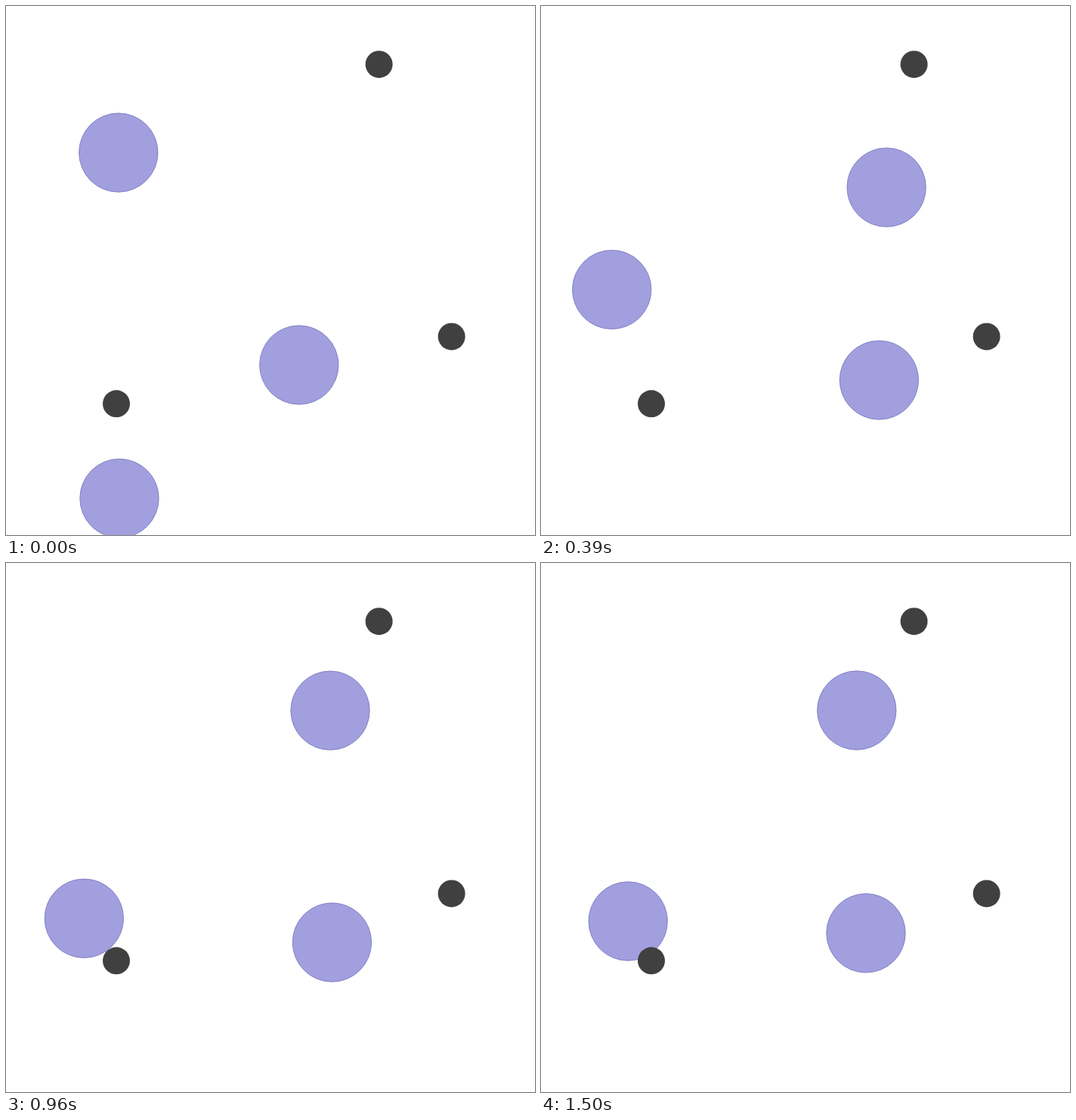
An HTML page that plays this animation: 700 px wide and 700 px high, repeating every 1530 ms.

```html
<!DOCTYPE html>
<html lang="en">
<head>
<meta charset="utf-8">
<title>Evolving circles</title>
<style>
  html, body { margin: 0; width: 100%; height: 100%; overflow: hidden; background: #fff; }
  svg { display: block; width: 100vw; height: 100vh; }
  .ball { fill: #a19fde; stroke: #7775bd; stroke-width: .8; }
  .peg { fill: #404040; }
</style>
</head>
<body>
<svg viewBox="0 0 700 700">
  <circle class="ball" r="52.2"/>
  <circle class="ball" r="52.2"/>
  <circle class="ball" r="52.2"/>
  <circle class="peg" cx="493.6" cy="77.2" r="18"/>
  <circle class="peg" cx="589.6" cy="437.4" r="18"/>
  <circle class="peg" cx="146" cy="526.3" r="18"/>
</svg>
<script>
const STEP = 30, STEPS = 51, SIZE = 700;
const balls = document.querySelectorAll('.ball');

// Generation, then the x and y genes of the three balls
const poses = [
  [0,  [148.8, 194, 387.8, 475, 150, 651.5]],
  [8,  [462.6, 240, 20.2, 375.3, 221, 508.4]],
  [18, [420.3, 197.5, 93.7, 460, 447.4, 495]],
  [27, [428, 195, 106.9, 473, 431.4, 504.8]],
  [37, [429, 193.8, 104, 474, 430.1, 502]],
  [43, [428, 194.9, 81.8, 474, 430, 502.5]],
  [50, [417.8, 195, 115.2, 474, 430, 489.8]]
];
const flipSign = [-1, 1, -1, -1, -1, 1];

function rand(a, b, c) {
  const s = Math.sin(a * 12.9898 + b * 78.233 + c * 37.719) * 43758.5453;
  return s - Math.floor(s);
}

// Every gene comes from one of two neighbouring poses, at times with a flipped bit
function genesAt(gen) {
  const next = poses.findIndex(p => p[0] >= gen);
  const [to, child] = poses[next];
  if (to === gen) return child;
  const [from, parent] = poses[next - 1];
  const mix = (gen - from) / (to - from);
  return parent.map((gene, i) => {
    const value = rand(gen, i, 1) < mix ? child[i] : gene;
    if (rand(gen, i, 2) > 0.25) return value;
    const bit = 7 + Math.floor(rand(gen, i, 3) * 4);
    return value + flipSign[i] * SIZE / 2 ** bit;
  });
}

let shown = -1;
function draw(gen) {
  if (gen === shown) return;
  shown = gen;
  const genes = genesAt(gen);
  balls.forEach((ball, i) => {
    ball.setAttribute('cx', genes[2 * i]);
    ball.setAttribute('cy', genes[2 * i + 1]);
  });
}

const start = performance.now();
function tick() {
  draw(Math.floor((performance.now() - start) / STEP) % STEPS);
  requestAnimationFrame(tick);
}
tick();
</script>
</body>
</html>
```
